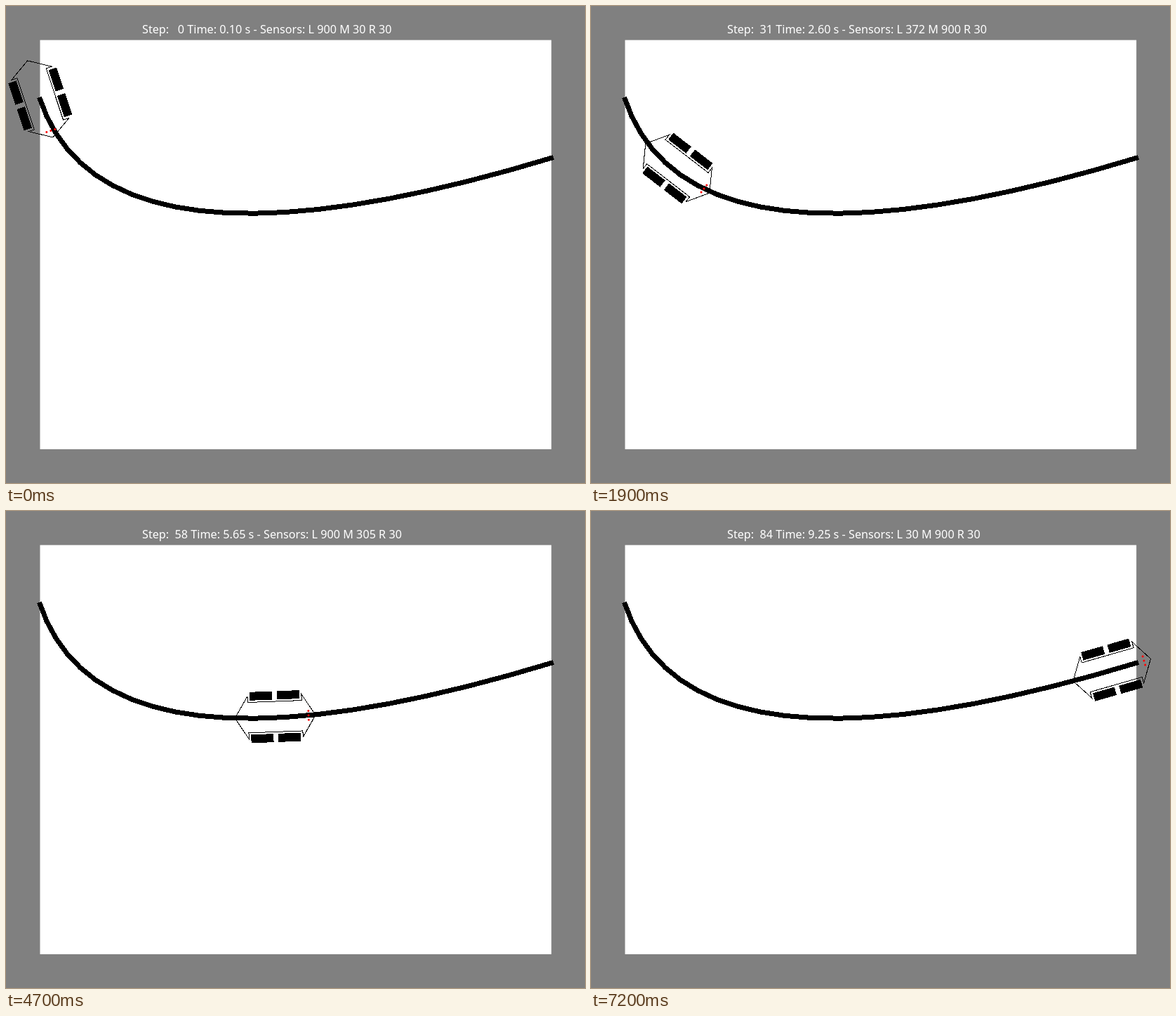
An HTML page that plays this animation: 825x679 px, repeating every 7.35 s.

```html
<!DOCTYPE html>
<html lang="en">
<head>
<meta charset="utf-8">
<title>Line follower simulation</title>
<style>
  html, body { margin: 0; width: 100%; height: 100%; overflow: hidden; background: #808080; }
  svg { display: block; }
  text { font: 16.2px "Noto Sans", "Open Sans", sans-serif; fill: #fff; white-space: pre; }
  .crisp { shape-rendering: crispEdges; }
</style>
</head>
<body>
<svg width="825" height="679" viewBox="0 0 825 679">
  <rect width="825" height="679" fill="#808080"/>
  <rect x="48.5" y="48.5" width="728.6" height="582.4" fill="#fff"/>
  <polyline id="track" class="crisp" fill="none" stroke="#000" stroke-width="7"/>
  <g id="robot">
    <path class="crisp" fill="none" stroke="#000" d="M-57.5 0L-38.5-30.5V-21.7H38.5V-30.5L57.5 0L38.5 30.5V21.7H-38.5V30.5Z"/>
    <g id="wheels" class="crisp"></g>
    <g id="sensors" fill="#f00"></g>
  </g>
  <text id="status" x="194" y="39"></text>
</svg>
<script>
const LOOP = 7350, LAST_STEP = 84;
const SENSOR_X = 47.5, SENSOR_GAP = 6.3;
const TRACK_SEGMENTS = 20;
const PIVOT = { x: 48.8, y: 132.4, from: 71.6, to: 80.2, turn: 0.7, drive: 0.98 };

// Milestones: `line` is how far the line lies to the left of the middle sensor
const milestones = [
  { step: 0, ms: 0, seconds: 0.10, line: 6.3 },
  { step: 12, ms: 700, seconds: 0.70, line: 9.051 },
  { step: 27, ms: 1450, seconds: 2.20, line: 0 },
  { step: 39, ms: 2650, seconds: 3.40, line: 6.3 },
  { step: 58, ms: 4700, seconds: 5.65, line: 4.415 },
  { step: 70, ms: 5900, seconds: 7.35, line: 2.361 },
  { step: 84, ms: 7200, seconds: 9.25, line: 0 }
];

const byId = id => document.getElementById(id);
const lerp = (a, b, k) => a + (b - a) * k;
const clamp01 = v => Math.min(1, Math.max(0, v));
const degrees = angle => angle * 180 / Math.PI;

function valueAt(step, key) {
  const next = Math.max(1, milestones.findIndex(m => m.step >= step));
  const a = milestones[next - 1], b = milestones[next];
  return lerp(a[key], b[key], (step - a.step) / (b.step - a.step));
}

// Quadratic Bezier; it continues beyond its end for u > 1
function trackPoint(u) {
  const bend = (a, b, c) => (1 - u) * (1 - u) * a + 2 * u * (1 - u) * b + u * u * c;
  return [bend(47.5, 138.5, 780), bend(130, 410, 215.5)];
}

// Place on the track reached by the sensors, which slow down along the curve parameter
const sensorPoint = s => trackPoint(-0.0656 + 0.1598 * s - 0.00475 * s * s);

// The robot pivots until it meets the line, then its sensors pull it along the track
function poseAt(seconds) {
  let { x, y } = PIVOT;
  const aim = s => {
    const [sx, sy] = sensorPoint(s);
    return Math.atan2(sy - y, sx - x);
  };
  if (seconds < PIVOT.turn) {
    return { x, y, heading: lerp(PIVOT.from, PIVOT.to, (seconds - 0.1) / (PIVOT.turn - 0.1)) };
  }
  if (seconds < PIVOT.drive) {
    const k = (seconds - PIVOT.turn) / (PIVOT.drive - PIVOT.turn);
    return { x, y, heading: lerp(PIVOT.to, degrees(aim(PIVOT.drive)), k) };
  }
  let angle;
  const slices = Math.ceil((seconds - PIVOT.drive) / 0.01);
  for (let i = 0; i <= slices; i++) {
    const s = lerp(PIVOT.drive, seconds, i / slices);
    angle = aim(s);
    const [sx, sy] = sensorPoint(s);
    x = sx - SENSOR_X * Math.cos(angle);
    y = sy - SENSOR_X * Math.sin(angle);
  }
  return { x, y, heading: degrees(angle) };
}

function reading(side, line) {
  const distance = Math.abs(side * SENSOR_GAP + line);
  return Math.round(30 + 870 * clamp01((5.3 - distance) / 2.8));
}

const steps = Array.from({ length: LAST_STEP + 1 }, (_, step) => {
  const seconds = Math.round(valueAt(step, "seconds") * 20) / 20;
  const [l, m, r] = [-1, 0, 1].map(side => reading(side, valueAt(step, "line")));
  return {
    start: Math.ceil(valueAt(step, "ms") / 50 - 1e-6) * 50,
    pose: poseAt(seconds),
    status: `Step: ${String(step).padStart(3)} Time: ${seconds.toFixed(2)} s`
      + ` - Sensors: L ${l} M ${m} R ${r}`
  };
});

function add(parent, tag, attrs) {
  const node = document.createElementNS("http://www.w3.org/2000/svg", tag);
  for (const name in attrs) node.setAttribute(name, attrs[name]);
  byId(parent).append(node);
}

const trackPoints = Array.from({ length: TRACK_SEGMENTS + 1 }, (_, i) => trackPoint(i / TRACK_SEGMENTS));
byId("track").setAttribute("points", trackPoints.join(" "));
for (const x of [-19.4, 19.4])
  for (const y of [-30.3, 30.3]) add("wheels", "rect", { x: x - 16, y: y - 6, width: 32, height: 12 });
for (const side of [-1, 0, 1]) add("sensors", "circle", { cx: SENSOR_X, cy: side * SENSOR_GAP, r: 1.5 });

function draw(ms) {
  const { pose, status } = steps.findLast(s => s.start <= ms);
  byId("robot").setAttribute("transform", `translate(${pose.x} ${pose.y}) rotate(${pose.heading})`);
  byId("status").textContent = status;
}

const begin = performance.now();
function tick() {
  draw((performance.now() - begin) % LOOP);
  requestAnimationFrame(tick);
}
tick();
</script>
</body>
</html>
```
